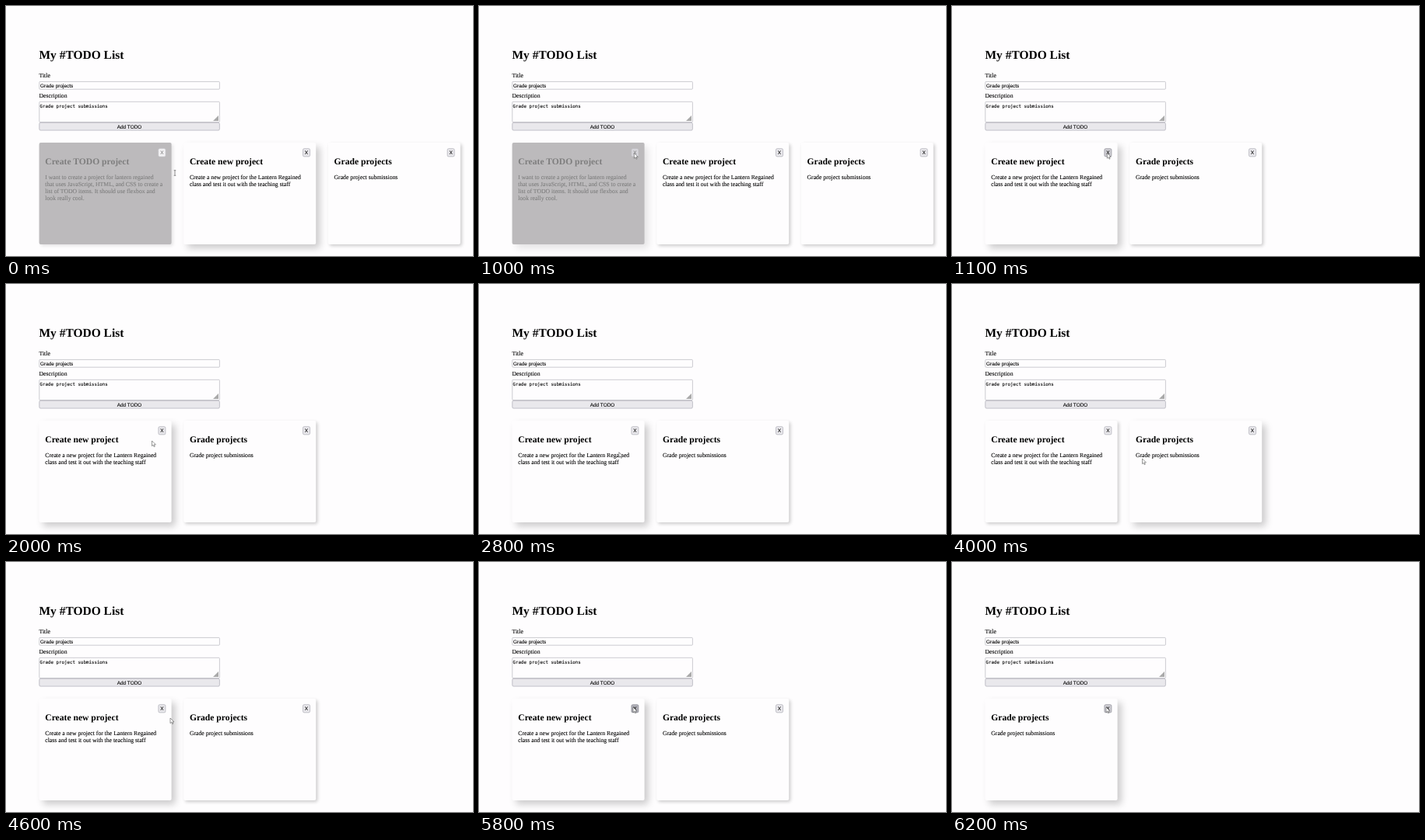
Animation, 600 px wide and 322 px high, one loop 8 s. Source, as an HTML page:

```html
<!DOCTYPE html>
<html lang="en">
<head>
<meta charset="utf-8">
<title>TODO list</title>
<style>
  html, body { margin: 0; width: 100%; height: 100%; overflow: hidden; background: #fefdfe; }
  svg { display: block; width: 600px; height: 322px; }
  text { font: 7.735px "Liberation Serif", "Times New Roman", serif; fill: #000; stroke: #000; stroke-width: .1; text-rendering: geometricPrecision; }
  .h1 { font-size: 15.47px; font-weight: bold; stroke: none; }
  .h2 { font-size: 11.6px; font-weight: bold; stroke: none; }
  .ui { font: 6.45px "Liberation Sans", Arial, sans-serif; }
  .mono { font: 5.8px "DejaVu Sans Mono", monospace; }
  .mid { text-anchor: middle; }
  .field { fill: #fefdfe; stroke: #a9a9b2; stroke-width: .6; }
  .btn { fill: #e9e8ec; stroke: #a0a0aa; stroke-width: .6; }
  .btn.hover { fill: #cfced4; stroke: #7c7c86; }
  .btn.active { fill: #b1b1b9; }
  .face { fill: #fefdfe; }
  .done { opacity: .5; }
  .done .face { fill: #7c7a7c; }
</style>
</head>
<body>
<svg viewBox="0 0 600 322">
  <text class="h1" x="42.5" y="67.6">My #TODO List</text>
  <text x="42.5" y="92.4">Title</text>
  <rect class="field" x="42.8" y="97.4" width="231.6" height="9.8" rx="1"/>
  <text class="ui" x="44" y="104.8">Grade projects</text>
  <text x="42.5" y="117.6">Description</text>
  <rect class="field" x="42.8" y="123.3" width="231.6" height="26.2" rx="1"/>
  <text class="mono" x="43.6" y="130.8">Grade project submissions</text>
  <path d="M266 148l7-7v7z" fill="#aaa"/>
  <rect class="btn" x="42.8" y="150.3" width="231.6" height="9.8" rx="1.6"/>
  <text class="ui mid" x="158.5" y="157.7">Add TODO</text>
  <g id="cards"></g>
  <path id="arrow" d="M0 0V6.7l1.6-1.4 1.1 2.4 1.1-.5-1.1-2.3h2.2z" fill="#fff" stroke="#555" stroke-width=".6"/>
  <path id="beam" d="M-1.3-3.3H1.3M0-3.3V3.3M-1.3 3.3H1.3" fill="none" stroke="#444" stroke-width=".6"/>
</svg>
<script>
const LOOP = 8000, STEP = 100, FADE = 150;
const $ = id => document.getElementById(id);
const clamp = v => Math.min(1, Math.max(0, v));
const mix = (a, b, p) => a + (b - a) * p;

const todos = [
  { title: "Create TODO project", done: true, lines: [
    "I want to create a project for lantern regained",
    "that uses JavaScript, HTML, and CSS to create a",
    "list of TODO items. It should use flexbox and",
    "look really cool."] },
  { title: "Create new project", lines: [
    "Create a new project for the Lantern Regained",
    "class and test it out with the teaching staff"] },
  { title: "Grade projects", lines: ["Grade project submissions"] }
];

const cards = todos.map(({ title, lines, done }) => {
  const g = document.createElementNS("http://www.w3.org/2000/svg", "g");
  if (done) g.classList.add("done");
  g.innerHTML = `
    <rect class="shadow" width="170" height="131" rx="2"/>
    <rect class="face" width="170" height="131" rx="2"/>
    <text class="h2" x="7.7" y="28">${title}</text>
    ${lines.map((s, i) => `<text x="7.7" y="${47 + 9 * i}">${s}</text>`).join("")}
    <rect class="btn" x="153.3" y="7.7" width="9" height="10.2" rx="1.6"/>
    <text class="ui mid" x="157.8" y="15.1">X</text>`;
  $("cards").append(g);
  return { g, shadow: g.querySelector(".shadow"), btn: g.querySelector(".btn") };
});

// Pointer moves: when, how long, where to
const moves = [
  { start: 0, time: 400, x: 199.3, y: 189.5 },
  { start: 1100, time: 200, x: 187.5, y: 202 },
  { start: 2600, time: 300, x: 176, y: 224 },
  { start: 3000, time: 200, x: 244.5, y: 225 },
  { start: 4300, time: 300, x: 211, y: 201 },
  { start: 4600, time: 400, x: 190, y: 186 },
  { start: 5100, time: 200, x: 198, y: 187 }
];
const clicks = [1000, 5800];
// Enter and leave times for each card place
const visits = [[[100, 3050], [4400, LOOP]], [[-FADE, 50], [3200, 4450]], []];

const pointer = t => moves.reduce((at, m) => {
  const p = clamp((t - m.start) / m.time);
  return { x: mix(at.x, m.x, p), y: mix(at.y, m.y, p) };
}, { x: 217, y: 215 });

const lift = (slot, t) => Math.max(0, ...visits[slot].map(([enter, leave]) =>
  Math.min(clamp((t - enter) / FADE), clamp(1 - (t - leave) / FADE))));

function draw(t) {
  const { x, y } = pointer(t);
  const removed = clicks.filter(c => t > c).length;
  const overX = Math.abs(x - 200.4) < 5 && Math.abs(y - 188.8) < 5.4;

  cards.forEach(({ g, shadow, btn }, i) => {
    const slot = i - removed;
    g.style.display = slot < 0 ? "none" : "";
    if (slot < 0) return;
    const h = lift(slot, t), shift = mix(2, 5, h);
    g.setAttribute("transform", `translate(${42.6 + 185.6 * slot} 176)`);
    shadow.setAttribute("transform", `translate(${shift} ${shift})`);
    shadow.style.filter = `blur(${mix(2.2, 4.6, h)}px)`;
    shadow.style.opacity = .2;
    btn.classList.toggle("hover", slot === 0 && overX);
    btn.classList.toggle("active", slot === 0 && clicks.includes(t));
  });

  const beam = t < 100;
  $("beam").style.display = beam ? "" : "none";
  $("arrow").style.display = beam ? "none" : "";
  $(beam ? "beam" : "arrow").setAttribute("transform", `translate(${x} ${y})`);
}

const start = performance.now();
function tick(now) {
  const t = Math.max(0, now - start) % LOOP;
  draw(Math.floor(t / STEP) * STEP);
  requestAnimationFrame(tick);
}
draw(0);
requestAnimationFrame(tick);
</script>
</body>
</html>
```
